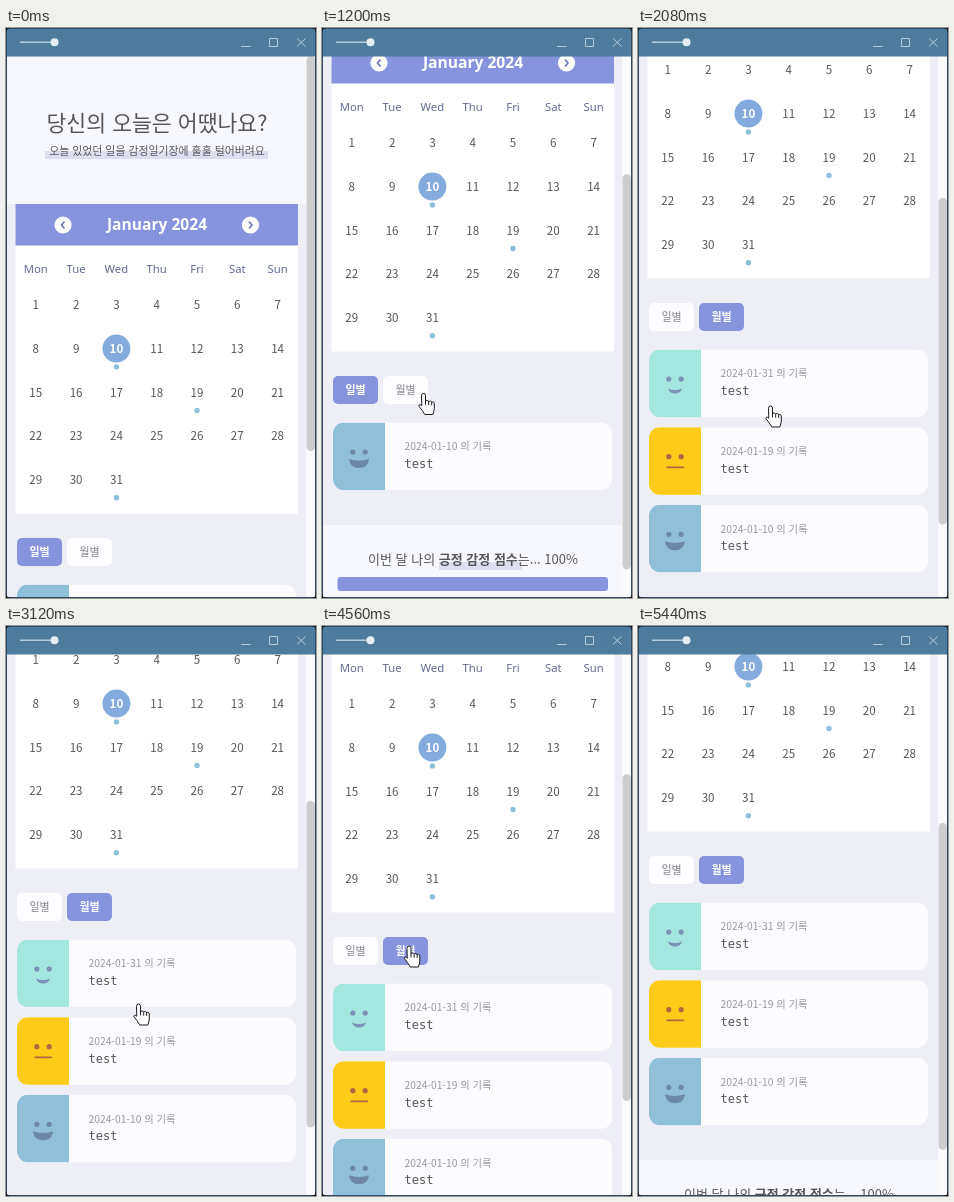
Write an HTML page that moves like this. It is 310 px wide and 570 px high and loops after 6560 ms.

```html
<!DOCTYPE html>
<html lang="ko">
<head>
<meta charset="utf-8">
<title>감정일기장</title>
<style>
  html, body { margin: 0; width: 100%; height: 100%; overflow: hidden; background: #16191d; }
  svg { display: block; width: 310px; height: 570px; }
  text { font-family: "Noto Sans CJK KR", "Noto Sans CJK", sans-serif; fill: #565658; }
  .latin { font-family: "Noto Sans", sans-serif; }
  .mono { font-family: "DejaVu Sans Mono", monospace; }
</style>
</head>
<body>
<svg id="stage" viewBox="0 0 310 570">
  <defs>
    <clipPath id="window"><rect width="310" height="570" rx="5"/></clipPath>
    <clipPath id="view"><rect x="1" y="28" width="308" height="541"/></clipPath>
    <clipPath id="card"><rect width="279" height="67.5" rx="11"/></clipPath>
  </defs>
  <g clip-path="url(#window)">
    <rect width="310" height="570" fill="#2f4a61"/>
    <g clip-path="url(#view)">
      <rect y="28" width="310" height="542" fill="#eeeef7"/>
      <g id="page"></g>
      <rect x="300" y="28" width="10" height="542" fill="#fafafb"/>
      <rect id="thumb" x="300.5" width="8.5" rx="4.2" fill="#cdcdce"/>
    </g>
    <rect x="1" y="1" width="308" height="27.5" fill="#4e7c9e"/>
    <g fill="none" stroke="#b4cad9">
      <path d="M14 14.2H48" stroke-width="1.6"/>
      <path d="M235 18.5H244.500M263.500 10.500H271.500V18.500H263.500ZM291 10.500L299.500 18.500M299.500 10.500L291 18.500"/>
    </g>
    <circle cx="48.500" cy="14.200" r="4" fill="#e4edf3"/>
  </g>
  <g id="cursor" fill="#fff" stroke="#1b1b1f" stroke-linejoin="round" stroke-linecap="round">
    <path d="M-2 2a2 2 0 0 1 4 0V8a1.700 1.700 0 0 1 3.200 .3a1.600 1.600 0 0 1 3 .7a1.500 1.500 0 0 1 2.600 .8V15Q10.500 18 9.300 21H1.300Q-1 17 -4.600 12.600Q-4.600 9.800 -2 12Z"/>
    <path d="M2 8V11M5.200 8.500V11.300M8.200 9.200V11.500" fill="none"/>
  </g>
</svg>
<script>
const LOOP = 6560, STEP = 80, VIEW = 541;
const PURPLE = '#8793dc', SOFT = '#f7f8fe', MARK = '#dddff0';
const $ = id => document.getElementById(id);

const rect = (x, y, w, h, fill, rx = 0) =>
  `<rect x="${x}" y="${y}" width="${w}" height="${h}" rx="${rx}" fill="${fill}"/>`;
const dot = (x, y, r, fill) => `<circle cx="${x}" cy="${y}" r="${r}" fill="${fill}"/>`;
// y is the optical middle of the line
const label = (x, y, size, str, { fill = '#565658', weight = 400, anchor = 'middle', font = '' } = {}) =>
  `<text x="${x}" y="${y + size * 0.36}" font-size="${size}" font-weight="${weight}"
    text-anchor="${anchor}" class="${font}" style="fill:${fill}">${str}</text>`;

function arrow(x, dir) {
  return dot(x, 197, 8.6, '#fff') +
    `<path d="M${x - 1.5 * dir} 193.500l${3 * dir} 3.500l${-3 * dir} 3.500" fill="none" stroke="#6672b4" stroke-width="1.600"/>`;
}

function calendar() {
  const colX = c => 29.8 + c * 40.3, rowY = r => 277.3 + r * 43.6;
  let out = rect(9.5, 176, 282.5, 309.5, '#fff') + rect(9.5, 176, 282.5, 41.5, PURPLE) +
    arrow(57, -1) + arrow(244.5, 1) +
    label(151, 196.5, 15.6, 'January 2024', { fill: '#fff', weight: 600, font: 'latin' });
  'Mon Tue Wed Thu Fri Sat Sun'.split(' ').forEach((day, c) => {
    out += label(colX(c), 241, 11.3, day, { fill: '#616a94', font: 'latin' });
  });
  for (let d = 1; d <= 31; d++) {
    const x = colX((d - 1) % 7), y = rowY(Math.floor((d - 1) / 7)), picked = d === 10;
    if (picked) out += dot(x, y - 0.3, 14, '#83abde');
    out += label(x, y, 11.6, d, { fill: picked ? '#fff' : '#565658', weight: picked ? 700 : 400 });
    if ([10, 19, 31].includes(d)) out += dot(x, y + 18, 2.7, '#8dbfda');
  }
  return out;
}

function tabs(active) {
  return ['일별', '월별'].map((name, i) => {
    const on = i === active;
    return rect(11 + i * 50, 510, 45, 28, on ? PURPLE : '#fdfdff', 5) +
      label(33.5 + i * 50, 524, 11, name, { fill: on ? '#fff' : '#858589', weight: on ? 700 : 400 });
  }).join('');
}

const moods = {
  10: { bg: '#8fbfd9', ink: '#6c88a8', mouth: '<path d="M16 36.500Q26 40 36 36.500Q35 45.500 26 45.500T16 36.500Z"/>' },
  19: { bg: '#fdcb18', ink: '#b5653f', mouth: '<rect x="17.500" y="39.300" width="17.500" height="1.700"/>' },
  31: { bg: '#a4e7df', ink: '#7b92b6', mouth: '<path d="M19 39Q26 42 33 39Q31.500 44 26 44T19 39Z"/>' }
};

function card(day, index) {
  const { bg, ink, mouth } = moods[day];
  return `<g transform="translate(11 ${556.6 + index * 77.6})"><g clip-path="url(#card)">` +
    rect(0, 0, 279, 68, '#fcfcff') + rect(0, 0, 52, 68, bg) +
    `<g fill="${ink}">${dot(19.8, 29.5, 2.6, ink)}${dot(32.2, 29.5, 2.6, ink)}${mouth}</g>` +
    label(71.5, 24, 10.3, `2024-01-${day} 의 기록`, { fill: '#98989c', anchor: 'start' }) +
    label(71.5, 41.3, 12, 'test', { anchor: 'start', font: 'mono' }) + '</g></g>';
}

const list = (id, active, days) => `<g id="${id}">${tabs(active)}${days.map(card).join('')}</g>`;

$('page').innerHTML =
  rect(0, 28, 301, 148, SOFT) + rect(39, 123, 223, 8, MARK) +
  label(151, 95.5, 21.6, '당신의 오늘은 어땠나요?', { weight: 500 }) +
  label(151, 123, 10.9, '오늘 있었던 일을 감정일기장에 훌훌 털어버려요') +
  calendar() + list('daily', 0, [10]) + list('monthly', 1, [31, 19, 10]) +
  '<g id="score">' + rect(0, 659, 301, 91, SOFT) + rect(117, 696, 83, 8, MARK) +
  label(151, 693, 13, '이번 달 나의 <tspan font-weight="700">긍정 감정 점수</tspan>는... 100%') +
  rect(15.5, 711, 270.5, 14, PURPLE, 3) + '</g>';

// [time, value...] points, linear between them
const scrollPath = [
  [480, 0], [560, 15], [640, 58], [720, 104], [800, 146], [880, 162],
  [1920, 162], [2000, 190], [2080, 235], [2160, 241], [2240, 243],
  [3600, 243], [3680, 199], [4800, 199], [4880, 219], [4960, 257], [5040, 276], [5120, 280]
];
const cursorPath = [
  [80, 3, 329], [240, 24, 361], [320, 24, 361], [480, 130, 418],
  [960, 130, 418], [1200, 101.5, 365.5], [1520, 101.5, 365.5], [1840, 132.5, 378],
  [3360, 132.5, 378], [3600, 36, 278], [3680, 36, 278], [3920, 87, 320],
  [4560, 87, 320], [4880, 158.5, 351], [4960, 158.5, 351], [5120, 325, 380]
];

function along(path, t) {
  const next = path.findIndex(p => p[0] > t);
  if (next === 0) return path[0].slice(1);
  if (next < 0) return path[path.length - 1].slice(1);
  const a = path[next - 1], b = path[next], k = (t - a[0]) / (b[0] - a[0]);
  return a.slice(1).map((v, i) => v + (b[i + 1] - v) * k);
}

function render(t) {
  const monthly = (t >= 1520 && t < 3680) || t >= 4560;
  const total = monthly ? 896 : 741;
  const [scroll] = along(scrollPath, t);
  const [x, y] = along(cursorPath, t);
  $('page').setAttribute('transform', `translate(0 ${-scroll})`);
  $('daily').style.display = monthly ? 'none' : '';
  $('monthly').style.display = monthly ? '' : 'none';
  $('score').setAttribute('transform', `translate(0 ${monthly ? 155 : 0})`);
  $('thumb').setAttribute('y', 28 + scroll * VIEW / total);
  $('thumb').setAttribute('height', VIEW * VIEW / total);
  $('cursor').setAttribute('transform', `translate(${x} ${y})`);
  $('cursor').style.display = t >= 80 && t < 5120 ? '' : 'none';
}

const start = performance.now();
function tick() {
  const t = (performance.now() - start) % LOOP;
  render(Math.floor(t / STEP) * STEP);
  requestAnimationFrame(tick);
}
tick();
</script>
</body>
</html>
```
